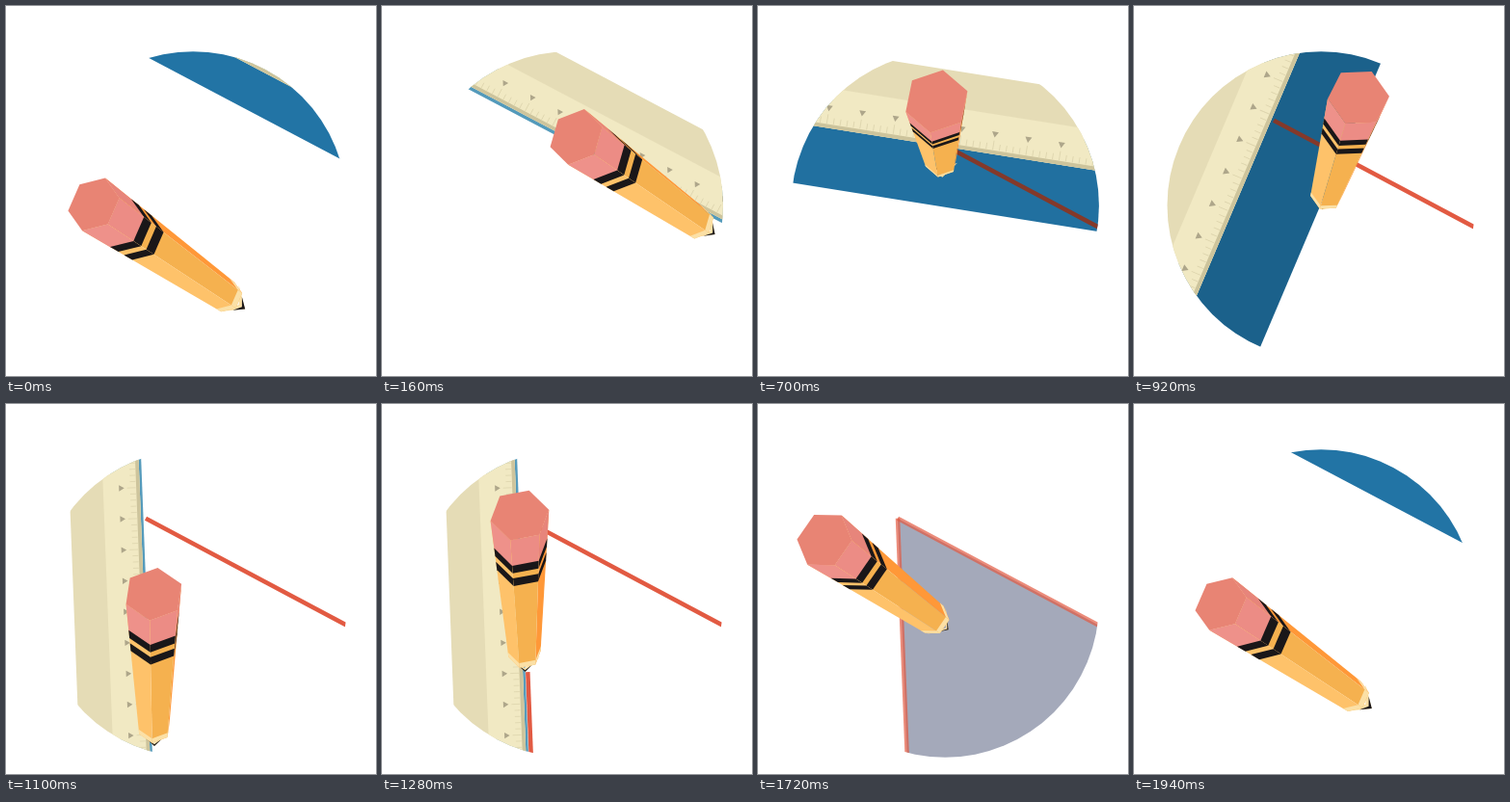
These frames come from a looping animation (384 by 384 pixels, 1960 ms). An HTML page with a canvas:

```html
<!DOCTYPE html>
<html lang="en">
<head>
<meta charset="utf-8">
<title>Ruler and pencil</title>
<style>
  html, body { margin: 0; width: 100%; height: 100%; overflow: hidden; background: #fff; }
  canvas { display: block; width: 384px; height: 384px; }
</style>
</head>
<body>
<canvas id="stage" width="384" height="384"></canvas>
<script>
const ctx = document.getElementById('stage').getContext('2d');
const LOOP = 1960;
const DISC = { x: 194.2, y: 207, r: 159.7 };
const APEX = [145, 118.7];
const RIGHT = [362, 234.1];
const BOTTOM = [155, 372];
const LIGHT = [330, 750]; // shadow offset per unit of lift
const BLACK = '#1a1719';
const CREAM = '#fbe0a6';

// Key poses: time, angle, edge distance from the disc centre, lift
const RULER = [
  [0, 27.8, 157, .0785],
  [180, 27.8, 59.5, 0],
  [540, 27.8, 59.5, 0],
  [700, 9.2, 60.3, .086],
  [920, -66.8, 82.4, .1325],
  [1100, -92.2, 50.8, 0],
  [1480, -92.2, 50.8, 0],
  [1560, -100, 70, .1],
  [1720, -112, 270, .15],
  [1721, 27.8, 336, .15]
];

// Key poses: time, eraser x, y, far end x, y
const PENCIL = [
  [0, 91, 206, 230, 302],
  [180, 205, 128, 332, 217],
  [380, 84, 63, 209, 151],
  [520, 47, 56, 132, 110],
  [700, 185, 99, 190, 161],
  [920, 233, 95, 200, 196],
  [1120, 150, 200, 152, 340],
  [1280, 143, 116, 148, 260],
  [1500, 48, 48, 133, 112],
  [1900, 89, 209, 227, 305]
];

const clamp = v => Math.max(0, Math.min(1, v));
const ramp = (t, a, b) => clamp((t - a) / (b - a));
const mix = (a, b, u) => a.map((v, i) => v + (b[i] - v) * u);
const rad = deg => deg * Math.PI / 180;

// Smooth cyclic interpolation that never overshoots its keys
function sample(keys, t) {
  const n = keys.length;
  const key = i => {
    const k = keys[(i + n) % n];
    return [k[0] + LOOP * Math.floor(i / n), ...k.slice(1)];
  };
  let i = n - 1;
  while (keys[i][0] > t) i--;
  const [a, b, c, d] = [key(i - 1), key(i), key(i + 1), key(i + 2)];
  const span = c[0] - b[0];
  const u = (t - b[0]) / span;
  const slope = (p, q, j) => (q[j] - p[j]) / (q[0] - p[0]);
  const tangent = (s, r) => s * r > 0 ? 2 * s * r / (s + r) : 0;
  return b.slice(1).map((v, k) => {
    const j = k + 1, mid = slope(b, c, j);
    const m0 = tangent(slope(a, b, j), mid) * span;
    const m1 = tangent(mid, slope(c, d, j)) * span;
    const u2 = u * u, u3 = u2 * u;
    return (2 * u3 - 3 * u2 + 1) * v + (u3 - 2 * u2 + u) * m0 +
      (3 * u2 - 2 * u3) * c[j] + (u3 - u2) * m1;
  });
}

function rulerAt(t) {
  const [angle, dist, lift] = sample(RULER, t);
  const a = rad(angle);
  return {
    angle: a, dist, lift,
    scale: 1 + lift,
    reach: 2.6 + lift * (LIGHT[1] * Math.cos(a) - LIGHT[0] * Math.sin(a)),
    slide: .0016 * (angle + 75) ** 2 - 6.5,
    bright: clamp((angle + 100) / 128)
  };
}

function pencilAt(t) {
  const [ex, ey, fx, fy] = sample(PENCIL, t);
  const length = Math.hypot(fx - ex, fy - ey);
  const heading = Math.atan2(fy - ey, fx - ex);
  const squash = Math.sqrt(1 - (length / 300) ** 2);
  // Point on a tilted ring, at an angle from the heading
  const ring = (x, y, r) => deg => {
    const along = r * squash * Math.cos(rad(deg)), across = r * Math.sin(rad(deg));
    return [x + along * Math.cos(heading) - across * Math.sin(heading),
      y + along * Math.sin(heading) + across * Math.cos(heading)];
  };
  const nearR = 36 - .035 * length, farR = 17;
  return {
    near: ring(ex, ey, nearR),
    far: ring(fx, fy, farR),
    tip: [fx + .13 * (fx - ex), fy + .13 * (fy - ey)],
    roll: 28 - .16 * ex - .13 * ey,
    limit: (nearR - farR) * squash / length
  };
}

function shape(points, fill) {
  ctx.beginPath();
  points.forEach(p => ctx.lineTo(...p));
  ctx.closePath();
  ctx.fillStyle = fill;
  ctx.fill();
}

function stroke(a, b, colour, width) {
  ctx.beginPath();
  ctx.moveTo(...a);
  ctx.lineTo(...b);
  ctx.strokeStyle = colour;
  ctx.lineWidth = width;
  ctx.stroke();
}

function drawFigure(t, tip, wedge, line) {
  const fade = 1 - ramp(t, 1660, 1860);
  ctx.globalAlpha = ramp(t, 1480, 1550) * fade;
  shape([APEX, RIGHT, [400, 400], BOTTOM], wedge);
  ctx.globalAlpha = fade;
  const rule = (from, axis, begin, end) => {
    if (t < begin) return;
    const u = t < end ? clamp((from[axis] - tip[axis]) / (from[axis] - APEX[axis])) : 1;
    stroke(from, mix(from, APEX, u), line, 4.5);
  };
  rule(RIGHT, 0, 180, 520);
  rule(BOTTOM, 1, 1120, 1500);
  ctx.globalAlpha = 1;
}

function drawShadow(t, tip, { angle, dist, reach, bright }) {
  const deep = mix([24, 90, 130], [34, 116, 165], bright);
  const rgb = mix([85, 155, 188], deep, ramp(reach, 3, 20));
  ctx.save();
  ctx.translate(DISC.x, DISC.y);
  ctx.rotate(angle);
  ctx.beginPath();
  ctx.rect(-400, -dist - 30, 800, reach + 30);
  ctx.clip();
  ctx.rotate(-angle);
  ctx.translate(-DISC.x, -DISC.y);
  ctx.fillStyle = `rgb(${rgb.map(Math.round)})`;
  ctx.fillRect(0, 0, 384, 384);
  drawFigure(t, tip, '#5c4a4f', '#84392a');
  ctx.restore();
}

function drawRuler({ angle, dist, slide, scale }) {
  ctx.save();
  ctx.translate(DISC.x, DISC.y);
  ctx.rotate(angle);
  ctx.translate(slide, -dist);
  ctx.scale(scale, scale);
  const band = (height, fill) => {
    ctx.fillStyle = fill;
    ctx.fillRect(-400, -height, 800, height);
  };
  band(73, '#e5dcb6');
  band(38, '#f1e9c3');
  band(3.6, '#cdc49c');
  const step = 32.1;
  for (let i = -6; i <= 6; i++) {
    const x = i * step;
    shape([[x - 3.2, -21.5], [x + 3.2, -21.5], [x, -16]], '#aea68a');
    for (let j = 0; j < 5; j++) {
      const at = x + j * step / 5;
      stroke([at, -4], [at, j ? -10 : -13], '#ded5ae', .8);
    }
  }
  ctx.restore();
}

function drawPencil({ near, far, tip, roll, limit }) {
  const base = [-80, 0, 80].map(far);
  shape([...base, tip], CREAM);
  shape([...base.map(p => mix(p, tip, .5)), tip], BLACK);

  const wood = ['#ff9838', '#f5b14f', '#fec26a'];
  const rubber = ['#e7857b', '#ec8c85', '#ee918a'];
  for (let k = -2; k <= 2; k++) {
    const out = roll + 60 * k;
    if (Math.cos(rad(out)) < limit) continue;
    const a = out - 30, b = out + 30;
    const tone = Math.max(0, Math.min(2, k + 1));
    const part = (from, to, fill) => shape([
      mix(near(a), far(a), from), mix(near(b), far(b), from),
      mix(near(b), far(b), to), mix(near(a), far(a), to)
    ], fill);
    part(0, 1, wood[tone]);
    part(.965, 1, CREAM);
    part(0, .21, rubber[tone]);
    part(.2, .26, BLACK);
    part(.3, .36, BLACK);
  }
  shape([0, 1, 2, 3, 4, 5].map(k => near(roll + 30 + 60 * k)), '#e88474');
}

function draw(t) {
  const ruler = rulerAt(t);
  const pencil = pencilAt(t);
  ctx.fillStyle = '#fff';
  ctx.fillRect(0, 0, 384, 384);
  ctx.save();
  ctx.beginPath();
  ctx.arc(DISC.x, DISC.y, DISC.r, 0, 2 * Math.PI);
  ctx.clip();
  drawFigure(t, pencil.tip, '#7d849c', '#e25a42');
  drawShadow(t, pencil.tip, ruler);
  drawRuler(ruler);
  ctx.restore();
  drawPencil(pencil);
}

const start = performance.now();
function tick() {
  draw((performance.now() - start) % LOOP);
  requestAnimationFrame(tick);
}
tick();
</script>
</body>
</html>
```
